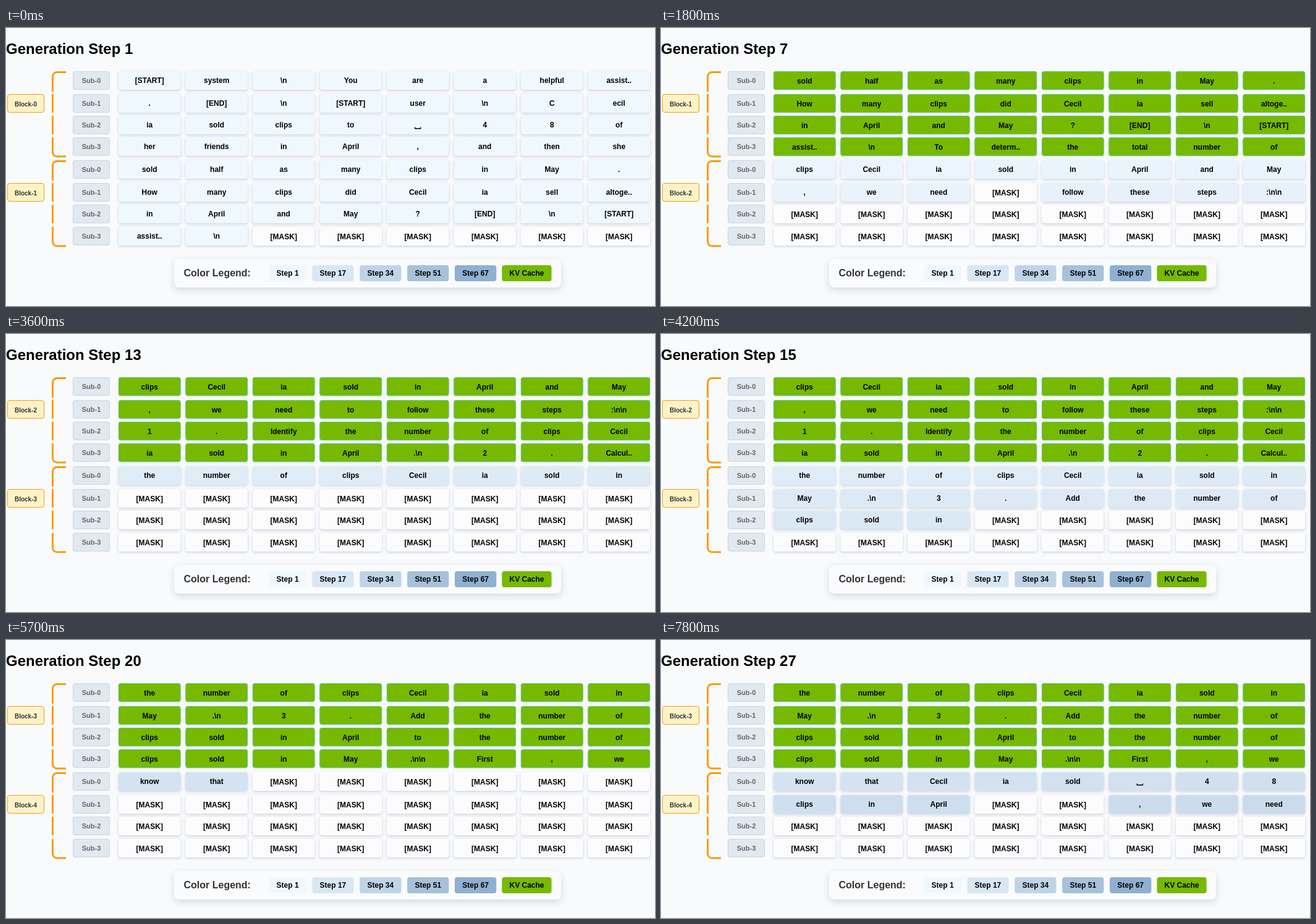
These frames come from a looping animation (1050x450 px, 8000 ms). An HTML page with a canvas:

```html
<!DOCTYPE html>
<html lang="en">
<head>
<meta charset="utf-8">
<title>Block generation</title>
<style>
html, body { margin: 0; width: 100%; height: 100%; overflow: hidden; background: #f8fafc; }
canvas { display: block; }
</style>
</head>
<body>
<canvas id="stage" width="1050" height="450"></canvas>
<script>
const ctx = document.getElementById("stage").getContext("2d");
const STEP_MS = 300, LOOP_MS = 8000;
const ROW_Y = [70, 107, 142, 177, 214, 251, 286, 322];
const ORANGE = "#f59e0b", GREEN = "#76b900", SPACE = "_";

// 32 tokens per block, four rows of eight
const words = [
  String.raw`[START] system \n You are a helpful assist..
    . [END] \n [START] user \n C ecil
    ia sold clips to _ 4 8 of
    her friends in April , and then she`,
  String.raw`sold half as many clips in May .
    How many clips did Cecil ia sell altoge..
    in April and May ? [END] \n [START]
    assist.. \n To determ.. the total number of`,
  String.raw`clips Cecil ia sold in April and May
    , we need to follow these steps :\n\n
    1 . Identify the number of clips Cecil
    ia sold in April .\n 2 . Calcul..`,
  String.raw`the number of clips Cecil ia sold in
    May .\n 3 . Add the number of
    clips sold in April to the number of
    clips sold in May .\n\n First , we`,
  String.raw`know that Cecil ia sold _ 4 8
    clips in April`
].map(s => s.split(/\s+/));
words[4].push("", "", ",", "we", "need");

// One character per token: steps after the block's first step
const firstStep = [1, 1, 4, 12, 20];
const delays = [
  "0".repeat(32),
  "0".repeat(26) + "111222",
  "00011111" + "22243333" + "55555555" + "66667777",
  "00001111" + "22222222" + "33344555" + "66667777",
  "00112233" + "455zz667"
];
const tokenStep = (b, i) => firstStep[b] + parseInt(delays[b][i] || "z", 36);

function stepColor(step) {
  const k = (step - 1) / 66;
  const mix = (a, b) => Math.round(a + (b - a) * k);
  return `rgb(${mix(240, 143)},${mix(248, 176)},${mix(255, 208)})`;
}

function text(str, x, y, size, color, align = "center") {
  ctx.font = `bold ${size}px "Liberation Sans", Helvetica, Arial, sans-serif`;
  ctx.textAlign = align;
  ctx.fillStyle = color;
  ctx.fillText(str, x, y);
}

function box(x, y, w, h, r, fill, border) {
  ctx.beginPath();
  ctx.roundRect(x, y, w, h, r);
  ctx.fillStyle = fill;
  ctx.fill();
  if (!border) return;
  ctx.shadowColor = "transparent";
  ctx.beginPath();
  ctx.roundRect(x + 0.5, y + 0.5, w - 1, h - 1, r - 0.5);
  ctx.strokeStyle = border;
  ctx.lineWidth = 1;
  ctx.stroke();
}

function shadowBox(dy, blur, alpha, ...shape) {
  ctx.save();
  ctx.shadowColor = `rgba(30,50,90,${alpha})`;
  ctx.shadowOffsetY = dy;
  ctx.shadowBlur = blur;
  box(...shape);
  ctx.restore();
}

function bracket(top) {
  const row = ROW_Y.slice(top, top + 4);
  const y0 = row[0] + 1.5, y1 = row[3] + 31;
  ctx.strokeStyle = ORANGE;
  ctx.lineWidth = 3;
  ctx.beginPath();
  ctx.moveTo(97, y0);
  ctx.arcTo(75.5, y0, 75.5, y0 + 8, 7);
  ctx.lineTo(75.5, row[0] + 33);
  for (const y of [row[1], row[2]]) {
    ctx.moveTo(75.5, y);
    ctx.lineTo(75.5, y + 30);
  }
  ctx.moveTo(75.5, row[3]);
  ctx.arcTo(75.5, y1, 97, y1, 7);
  ctx.lineTo(97, y1);
  ctx.stroke();
}

function spaceMark(x, y) {
  ctx.strokeStyle = "#000";
  ctx.lineWidth = 1.4;
  ctx.beginPath();
  ctx.moveTo(x - 4.6, y - 0.5);
  ctx.lineTo(x - 4.6, y + 1.8);
  ctx.lineTo(x + 4.6, y + 1.8);
  ctx.lineTo(x + 4.6, y - 0.5);
  ctx.stroke();
}

function cell(b, i, y, step, cached) {
  const x = 182 + (i % 8) * 108.5, w = 100.5, mid = x + w / 2;
  const born = tokenStep(b, i), ready = born <= step;
  if (cached) shadowBox(1, 3, 0.16, x, y, w, 30, 4, GREEN, "#4ecb71");
  else shadowBox(1.5, 4, 0.2, x, y, w, 30, 4, ready ? stepColor(born) : "#fcfcfd");
  const word = ready ? words[b][i] : "[MASK]";
  const base = y + (cached || !ready ? 20 : 19);
  if (word === SPACE) spaceMark(mid, base);
  else text(word, mid, base, 12, "#000");
}

function block(b, top, step, cached) {
  bracket(top);
  const labelY = ROW_Y[top + 1];
  box(2, labelY, 60, 30, 4, "#fef3c7", ORANGE);
  text("Block-" + b, 32, labelY + 20, 10, "#333");
  for (let r = 0; r < 4; r++) {
    const y = ROW_Y[top + r];
    box(108, y, 60, 30, 4, "#e2e8f0", "#cbd5e1");
    text("Sub-" + r, 138, y + 19, 11, "#666");
    for (let c = 0; c < 8; c++) cell(b, r * 8 + c, y, step, cached);
  }
}

function legend() {
  shadowBox(4, 12, 0.16, 272, 374, 626, 46, 8, "#fafbfd");
  text("Color Legend:", 287.5, 402, 16, "#333", "left");
  const item = (label, x, w, fill) => {
    box(x, 384, w, 26, 4, fill);
    text(label, x + w / 2, 401, 12, "#000");
  };
  item("Step 1", 425.2, 60.7, stepColor(1));
  [17, 34, 51, 67].forEach((s, i) => item("Step " + s, 495.3 + i * 76.9, 67.3, stepColor(s)));
  item("KV Cache", 802.4, 80.2, GREEN);
}

function draw(ms) {
  const step = Math.floor((ms % LOOP_MS) / STEP_MS) + 1;
  let last = 1;
  while (last < 4 && firstStep[last + 1] <= step) last++;
  ctx.fillStyle = "#f8fafc";
  ctx.fillRect(0, 0, 1050, 450);
  text("Generation Step " + step, 0, 42, 24, "#000", "left");
  block(last - 1, 0, step, last > 1);
  block(last, 4, step, false);
  legend();
}

let start;
function tick(now) {
  start ??= now;
  draw(now - start);
  requestAnimationFrame(tick);
}
draw(0);
requestAnimationFrame(tick);
</script>
</body>
</html>
```
